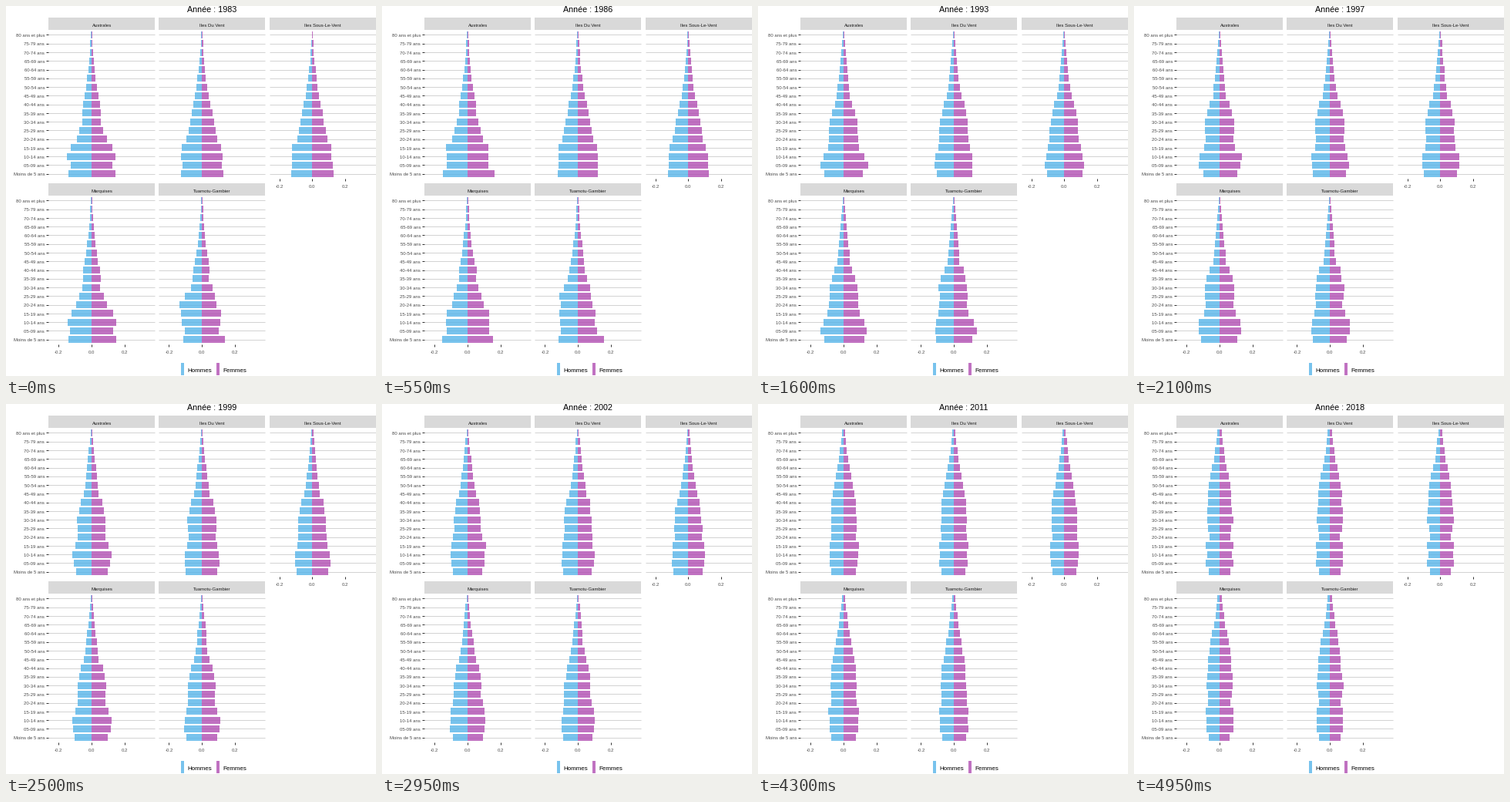
Recreate the animation shown at these times as a matplotlib script. Size 480x480 px, loop 5000 ms.

```python
import numpy as np
import matplotlib
import matplotlib.pyplot as plt
from matplotlib.animation import FuncAnimation
from matplotlib.patches import Rectangle

matplotlib.rcParams["font.family"] = "Liberation Sans"

SIZE, DPI = 480, 96
FRAMES, INTERVAL = 100, 50
BLUE, PURPLE, ALPHA = "#56B4E9", "#B14DB2", 0.8
UNIT = 42.6            # pixels for a share of 0.2
PITCH, BAR = 11.26, 9
PANEL_W, PANEL_H = 138, 17.2 * PITCH

REGIONS = ["Australes", "Iles Du Vent", "Iles Sous-Le-Vent",
           "Marquises", "Tuamotu-Gambier"]
AGES = (["Moins de 5 ans", "05-09 ans"]
        + [f"{a}-{a + 4} ans" for a in range(10, 80, 5)]
        + ["80 ans et plus"])
GROUPS = np.arange(len(AGES))

# General age profile: half-widths in pixels at a few age groups and years.
KNOTS = [0, 1, 2, 3, 4, 6, 8, 9, 11, 13, 16]
PROFILE = {
    1983: [27.5, 26, 26, 25.5, 20, 15.3, 11, 8.7, 5.4, 2.8, 0.8],
    1997: [22.5, 25, 23.5, 19.5, 18.3, 19, 14, 9.2, 6.4, 4.2, 1.1],
    2007: [16.8, 19, 19.7, 20.5, 18, 16.3, 16, 13.2, 8.3, 5.1, 1.6],
    2018: [14, 17.3, 16.7, 17.7, 14.2, 17.3, 15.3, 15, 12.1, 7, 2.8],
}

# Large or small generations: birth year, men, women, year they level out.
OUTER = [(1951, -4, -4, 2004), (1971, 5, 5, 1994), (1986, 10, 10, 2010)]
WAVES = {
    "Australes": OUTER,
    "Marquises": OUTER,
    "Tuamotu-Gambier": [(1946, -1, -4, 2010), (1960, 10, 0, 1998),
                        (1978, -5, -2, 1997), (1985, 0, 9, 2000)],
}
# A single odd year among the women: region, year, age group, extra width
OUTLIER = ("Tuamotu-Gambier", 1990, 5, 36)

rng = np.random.default_rng(7)
BIRTHS = np.arange(1895, 2025, 5)
jitter = {r: rng.normal(0, 0.035, (2, len(BIRTHS))) for r in REGIONS}


def general_profile(year):
    knots = [np.interp(year, list(PROFILE), c) for c in zip(*PROFILE.values())]
    return np.interp(GROUPS, KNOTS, knots)


def widths(region, year):
    """Half-widths of the men's and women's bars, youngest first."""
    births = year - 5 * GROUPS - 2.5
    sides = np.tile(general_profile(year), (2, 1))
    for born, men, women, end in WAVES.get(region, []):
        fade = max(0, (end - year) / (end - 1983))
        wave = fade * np.exp(-((births - born) / 5) ** 2)
        sides += np.outer([men, women], wave)
    for side, noise in zip(sides, jitter[region]):
        side *= 1 + np.interp(births, BIRTHS, noise)
    name, peak, group, extra = OUTLIER
    if region == name:
        sides[1, group] += extra * max(0, 1 - abs(year - peak))
    return sides


def year_at(frame):
    """Years rest for two frames, later for one, with a halfway frame between."""
    if frame < 86:
        return 1983 + frame // 3 + 0.5 * (frame % 3 == 2)
    return 2011.5 + (frame - 86) / 2


fig = plt.figure(figsize=(SIZE / DPI, SIZE / DPI), dpi=DPI, facecolor="white")
ax = fig.add_axes([0, 0, 1, 1])
ax.set_xlim(0, SIZE)
ax.set_ylim(SIZE, 0)
ax.axis("off")


def box(x, y, w, h, color, alpha=1):
    return ax.add_patch(Rectangle((x, y), w, h, fc=color, lw=0,
                                  alpha=alpha, zorder=2))


def label(x, y, text, px, color="black", ha="center"):
    return ax.text(x, y, text, size=px * 72 / DPI, color=color, ha=ha,
                   va="baseline")


def line(xs, ys, color):
    ax.plot(xs, ys, color=color, lw=72 / DPI, zorder=1,
            solid_capstyle="butt")


def axis_x(zero, bottom):
    for step in (-1, 0, 1):
        x = zero + step * UNIT
        line([x, x], [bottom, bottom + 3], "#333333")
        label(x, bottom + 12, f"{step * 0.2:.1f}", 6, "#4D4D4D")


def make_panel(index, region):
    row, col = divmod(index, 3)
    left = 55.2 + 143.2 * col
    top = 30.74 + 214.95 * row
    zero = left + 55.7
    box(left, top - 15.7, PANEL_W, 16, "#D9D9D9")
    label(left + PANEL_W / 2, top - 4, region, 6, "#1A1A1A")

    men, women = [], []
    for group, text in enumerate(AGES):
        y = top + PITCH * (len(AGES) - 0.4 - group)
        line([left, left + PANEL_W], [y, y], "#D3D3D3")
        if col == 0:
            line([left - 3, left], [y, y], "#333333")
            label(left - 5, y + 2.7, text, 6, "#4D4D4D", "right")
        men.append(box(zero, y - BAR / 2, 0, BAR, BLUE, ALPHA))
        women.append(box(zero, y - BAR / 2, 0, BAR, PURPLE, ALPHA))

    if index >= 2:
        axis_x(zero, top + PANEL_H)
    return region, zero, men, women


panels = [make_panel(i, region) for i, region in enumerate(REGIONS)]

title = label(267.2, 8.1, "", 10.8)
for x, text, color in ((227, "Hommes", BLUE), (273, "Femmes", PURPLE)):
    box(x, 463, 4, 16, color, ALPHA)
    label(x + 8.3, 474.7, text, 8, ha="left")


def update(frame):
    year = year_at(frame)
    title.set_text(f"Année : {int(year)}")
    for region, zero, men, women in panels:
        left, right = widths(region, year)
        for bar, w in zip(men, left):
            bar.set_x(zero - w)
            bar.set_width(w)
        for bar, w in zip(women, right):
            bar.set_width(w)


anim = FuncAnimation(fig, update, frames=FRAMES, interval=INTERVAL,
                     init_func=lambda: update(0), repeat=True,
                     repeat_delay=0, blit=False)
plt.show()
```
